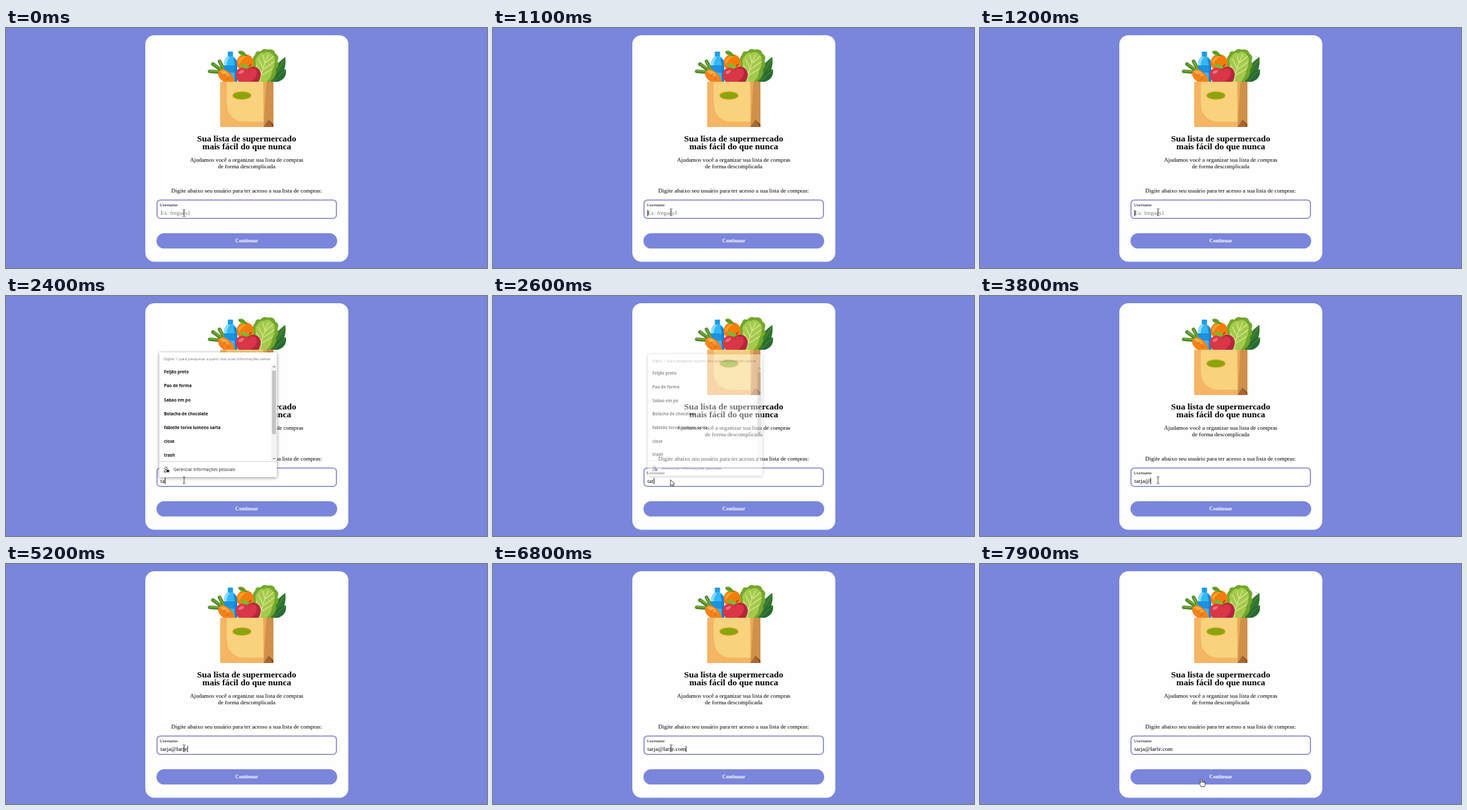
Recreate the animation shown at these times as an HTML page. Size 732x366 px, loop 8000 ms.

```html
<!DOCTYPE html>
<html lang="pt">
<head>
<meta charset="utf-8">
<title>Lista de supermercado</title>
<style>
  html, body { margin: 0; height: 100%; overflow: hidden; background: #7986db; }
  svg { display: block; width: 732px; height: 366px; }
  text { font: 8.96px "Liberation Serif", "Times New Roman", serif; }
  .mid { text-anchor: middle; }
  .title { font-size: 13.44px; font-weight: bold; }
  .label { font-size: 6.72px; }
  .button { font-size: 7.84px; font-weight: bold; fill: #fff; }
  #popup text { font: 6.3px "Open Sans", "Noto Sans", sans-serif; fill: #222; }
  #popup .hint { font-size: 5.8px; fill: #707070; }
  #popup .item { font-size: 6.35px; font-weight: bold; fill: #111; }
  #popup .box { filter: drop-shadow(0 1.5px 2.5px #0007); }
</style>
</head>
<body>
<svg viewBox="0 0 732 366">
  <rect x="212" y="11" width="309" height="345.5" rx="14" fill="#fefefe"/>

  <g id="leaves" stroke-linecap="round" fill="none">
    <path d="M333 68L310 66M333 68L315 55M334 67L325 51" stroke="#4f8a2c" stroke-width="5.5"/>
    <path d="M332 67L310 65M333 66L316 55M333 65L325 51" stroke="#79ab35" stroke-width="2"/>
  </g>
  <g id="bottle">
    <rect x="337.5" y="36" width="8" height="7" rx="1" fill="#1e9be9"/>
    <path d="M338 43H345Q352 47 352 54V82H332V54Q332 47 338 43Z" fill="#35b6f4"/>
    <path d="M338 44H341Q336 50 336 56V82H332V54Q332 47 338 44Z" fill="#8bdcfa"/>
    <path d="M332 57H352V68H332Z" fill="#1992e2"/>
    <path d="M346 46Q352 49 352 55V82H348V55Z" fill="#1583d2"/>
  </g>
  <g id="orange">
    <circle cx="364" cy="53" r="13" fill="#f57c0b"/>
    <path d="M353 50Q358 41 368 43Q359 45 355 56Z" fill="#fba22b"/>
    <path d="M353 36Q361 31 367 43Q356 44 353 36Z" fill="#70a529"/>
    <path d="M354 37Q361 37 367 43" stroke="#3f7e26" fill="none"/>
  </g>
  <g id="spinach">
    <path d="M403 82Q402 61 425 44Q428 64 413 82Z" fill="#2f752f"/>
    <path d="M406 82Q410 66 426 63Q428 77 414 82Z" fill="#276b31"/>
    <path d="M406 81Q412 65 424 47M409 81Q415 71 425 65" stroke="#6d9f3c" stroke-width=".8" fill="none"/>
  </g>
  <g id="lettuce">
    <path d="M381 82Q373 65 377 53Q374 45 379 41Q380 34 387 36Q392 30 398 33Q408 31 410 39Q417 43 413 50Q417 57 411 63Q412 73 402 82Z" fill="#73a72c"/>
    <path d="M384 82Q378 67 380 55Q378 47 383 43Q387 37 393 38Q400 34 406 41Q411 45 408 52Q410 59 405 64Q405 74 397 82Z" fill="#a4ca4c"/>
    <path d="M387 82Q389 61 400 40M389 69L381 56M391 61L384 47M394 53L391 41M389 72L406 62M392 63L409 51M395 53L407 43" stroke="#dce99b" stroke-width="1.1" fill="none"/>
  </g>
  <g id="carrot">
    <path d="M323 67Q328 60 336 65Q345 70 349 82H331Q321 75 323 67Z" fill="#f5811c"/>
    <path d="M325 66Q331 62 337 68L341 74Q331 72 325 66Z" fill="#ffad42"/>
    <path d="M331 72L336 70M336 79L341 76" stroke="#cf5b11" stroke-width="1"/>
  </g>
  <g id="apple">
    <path d="M369 62Q376 56 384 62Q391 70 384 82H354Q346 72 352 64Q360 57 369 62Z" fill="#d93647"/>
    <path d="M369 62Q376 56 384 62Q391 70 384 82H372Q386 73 380 63Q375 61 369 62Z" fill="#b7253f"/>
    <ellipse cx="358" cy="67" rx="4.5" ry="2.2" transform="rotate(-30 358 67)" fill="#ee7077"/>
    <path d="M369 65Q369 59 373 55" stroke="#75431f" stroke-width="1.2" fill="none"/>
    <path d="M356 56Q364 51 371 61Q361 64 356 56Z" fill="#84b532"/>
  </g>
  <g id="bag">
    <path d="M326 82H393V151H326Z" fill="#f4b565"/>
    <path d="M336 82H392V143H362Q337 141 336 115Z" fill="#f8d27c"/>
    <path d="M391.500 82H397V143L392 151Z" fill="#e9a858"/>
    <path d="M396.500 82H407V146L392 151Z" fill="#cf904a"/>
    <path d="M392 151L399 140L407 147V151Z" fill="#a9672f"/>
    <path d="M399 140L407 147V151Z" fill="#87491f"/>
    <ellipse cx="359" cy="103" rx="14" ry="6" fill="#88a60b" stroke="#eda034" stroke-width="1.2"/>
  </g>

  <text class="mid title" x="366.300" y="173">Sua lista de supermercado</text>
  <text class="mid title" x="366.300" y="185.400">mais fácil do que nunca</text>
  <text class="mid" x="366.300" y="203.800">Ajudamos você a organizar sua lista de compras</text>
  <text class="mid" x="366.300" y="213.800">de forma descomplicada</text>
  <text class="mid" x="366.300" y="250.600">Digite abaixo seu usuário para ter acesso a sua lista de compras:</text>

  <rect x="229.800" y="262.300" width="273" height="28" rx="5" fill="#fff" stroke="#6c6fbd" stroke-width="1.300"/>
  <text class="label" x="234" y="272.300">Username</text>
  <text id="hint" x="235" y="285.400" fill="#757575">Ex: freguês1</text>
  <text id="typed" x="235" y="285.400"></text>
  <rect id="caret" y="277.500" width=".9" height="9.500"/>

  <rect x="229" y="313" width="275" height="23.300" rx="11.600" fill="#7986db"/>
  <text class="mid button" x="366.500" y="327">Continuar</text>

  <g id="popup">
    <rect class="box" x="233.300" y="86" width="179" height="190.300" rx="1.500" fill="#fff"/>
    <text class="hint" x="240" y="98.300">Digite '/' para pesquisar a partir das suas informações salvas</text>
    <g id="items"></g>
    <rect x="403.500" y="104" width="8.800" height="148" fill="#f3f3f3"/>
    <rect x="404.800" y="114" width="6" height="96.500" fill="#c4c4c4"/>
    <path d="M406 109L408 107L410 109M406 247L408 249L410 247" fill="none" stroke="#555" stroke-width=".9"/>
    <path d="M233.300 252.500H412.300" stroke="#ccc" stroke-width=".8"/>
    <circle cx="243.500" cy="262.800" r="1.900" fill="none" stroke="#333" stroke-width=".9"/>
    <path d="M244 268.500H240.500Q240.500 265.800 243.500 265.800" fill="none" stroke="#333" stroke-width=".9"/>
    <rect x="244.300" y="265" width="4" height="3.700" rx=".5" fill="#222"/>
    <text x="255" y="267.200">Gerenciar informações pessoais</text>
  </g>

  <g id="beam" fill="none" stroke="#333" stroke-width=".9">
    <path d="M-2-5.200H-.7L0-4.500L.7-5.200H2M0-4.500V4.500M-2 5.200H-.7L0 4.500L.7 5.200H2"/>
  </g>
  <path id="arrow" d="M0 0V9.500L2.200 7.500L3.700 10.800L5.200 10.100L3.800 7H6.600Z" fill="#fff" stroke="#222" stroke-width=".8"/>
  <path id="hand" d="M-1 1Q0-.8 1 1V5Q2.200 4 3 5.300Q4.200 4.500 4.700 5.800Q6 5.200 6 7V9.500Q5.500 11 5 13H-.5Q-1 11-3.200 8Q-3.500 6.200-1 7.800ZM1 5V7.300M3 5.300V7.500M4.700 5.800V7.700" fill="#fff" stroke="#222" stroke-width=".8"/>
</svg>
<script>
const el = id => document.getElementById(id);
const show = (id, on) => el(id).setAttribute('visibility', on ? 'visible' : 'hidden');
const LOOP = 8000, STEP = 100, BLINK = 500;
const EMAIL = 'tarja@larfe.com';

// [time, characters typed]; each entry also restarts the caret blink
const KEYS = [[1100, 0], [1200, 0], [2400, 2], [2600, 3], [2700, 4], [2900, 5],
  [3700, 6], [3800, 6], [4500, 7], [4600, 8], [4800, 9], [5000, 10], [5200, 11],
  [5800, 12], [6000, 13], [6200, 14], [6400, 15]];

// [time, x, y] of the pointer
const PATH = [[0, 271, 282.2], [100, 271, 282.2], [200, 271, 281], [7000, 271, 281],
  [7200, 287, 299], [7400, 331, 330], [7500, 337, 332], [7600, 336.700, 326.500], [LOOP, 336.700, 326.500]];

const ITEMS = ['Feijão preto', 'Pao de forma', 'Sabao em po', 'Bolacha de chocolate',
  'fabielle torva lumeno sarta', 'close', 'trash'];
el('items').innerHTML = ITEMS.map((s, i) =>
  `<text class="item" x="240.500" y="${118.2 + i * 21.2}">${s}</text>`).join('');

function pointerAt(t) {
  const i = PATH.findIndex(p => p[0] > t);
  const [a, b] = [PATH[i - 1], PATH[i]];
  const k = (t - a[0]) / (b[0] - a[0]);
  return [1, 2].map(n => a[n] + (b[n] - a[n]) * k);
}

function drawField(t) {
  const [since, count] = KEYS.filter(k => k[0] <= t).pop() || [Infinity, 0];
  const typed = el('typed');
  typed.textContent = EMAIL.slice(0, count);
  show('hint', !count);
  show('caret', t >= since && Math.floor((t - since) / BLINK) % 2 === 0);
  el('caret').setAttribute('x', 235.2 + (count ? typed.getComputedTextLength() : 0));
}

function drawPopup(t) {
  const fade = Math.min(1, Math.max(0, (t - 2500) / 180));
  const scale = 1 - 0.045 * fade;
  show('popup', t >= 2400 && fade < 1);
  el('popup').setAttribute('opacity', 1 - fade);
  el('popup').setAttribute('transform',
    `translate(322 198) scale(${scale}) translate(-322 -198)`);
}

function drawPointer(t) {
  const [x, y] = pointerAt(t);
  const overPopup = t >= 2500 && t < 2800;
  const kind = y > 313 ? 'hand' : y > 290 || overPopup ? 'arrow' : 'beam';
  for (const id of ['beam', 'arrow', 'hand']) show(id, id === kind);
  const dx = overPopup ? -1 : 0;
  el(kind).setAttribute('transform', `translate(${x + dx} ${y + dx})`);
}

function draw() {
  const t = Math.floor(performance.now() % LOOP / STEP) * STEP;
  drawField(t);
  drawPopup(t);
  drawPointer(t);
  requestAnimationFrame(draw);
}
draw();
</script>
</body>
</html>
```
